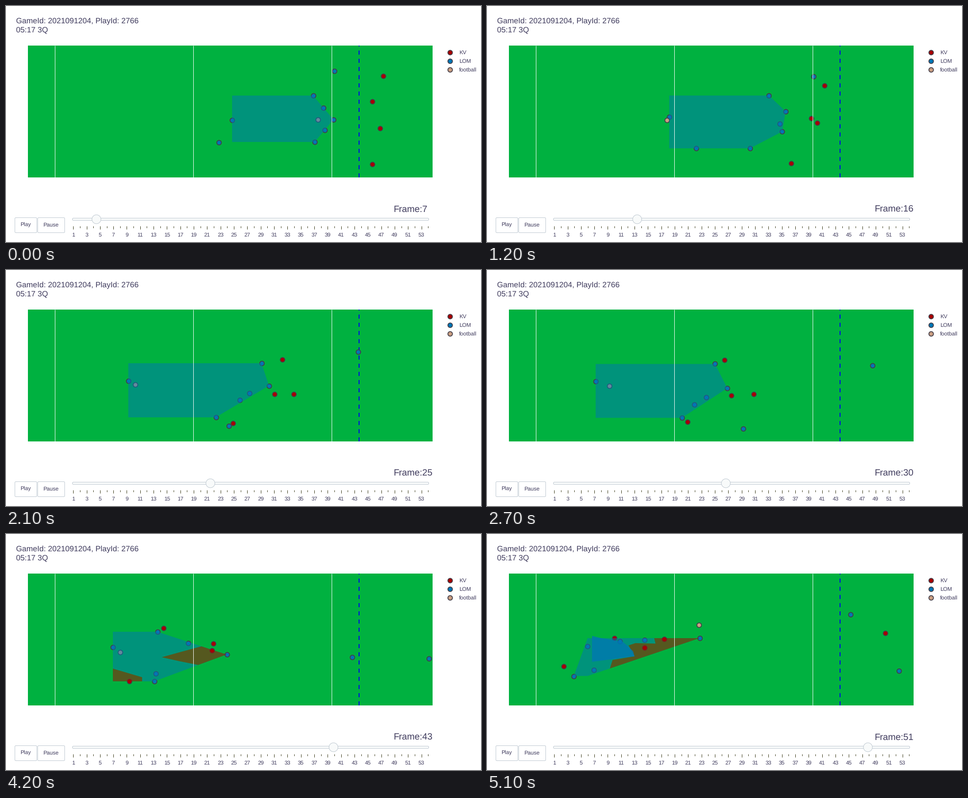
These frames come from a looping animation (1040x519 px, 5200 ms). A matplotlib script:

```python
import matplotlib.pyplot as plt
import numpy as np
from matplotlib.animation import FuncAnimation
from matplotlib.patches import Circle, FancyBboxPatch, PathPatch, Polygon, Rectangle
from matplotlib.path import Path

W, H, DPI = 1040, 519, 64
FRAMES, INTERVAL = 52, 100
PX = 72 / DPI  # points per pixel

GREEN, RED, BLUE, TAN = "#00b140", "#aa0000", "#0076b6", "#cba083"
INK, EDGE, BORDER, PALE = "#403c5e", "#453f49", "#bec8d1", "#f8fafa"

plt.rcParams["font.family"] = "Liberation Sans"
plt.rcParams["text.hinting"] = "none"

# Motion keys: tick of the loop, then positions at those ticks
KEYS = np.array([0, 7, 16, 21, 34, 42, 51])
COUNT = [7, 12, 20, 25, 36, 43, 51]
GRIP = [198, 268.5, 377, 447.5, 611, 717, 834]

OFFENSE = dict(
    qb=[(495, 250.5), (460, 247.5), (340, 242.5), (267.5, 244), (239.5, 247), (234, 249), (220, 247)],
    lt=[(672.5, 197), (644.5, 194.5), (592.5, 200), (559.5, 205), (418, 207.5), (332, 215), (291, 236)],
    lg=[(695, 223.5), (680.5, 224.5), (624, 240.5), (576, 254.5), (470.5, 255), (399, 240), (344.5, 232.5)],
    c=[(717, 249.5), (685, 254), (597, 264), (532.5, 270.5), (456, 283), (483.5, 265), (466, 229)],
    rg=[(698, 273), (694, 273.5), (591, 280), (512, 286), (404, 306), (328, 307), (234, 298.5)],
    rt=[(676, 299), (640, 304), (519, 320), (459.5, 324), (399, 324.5), (325, 324), (190, 312.5)],
    te=[(719, 142.5), (723, 149.5), (722, 162.5), (770.5, 180), (915, 247), (925.5, 274), (901.5, 301)],
    rb=[(465.5, 299.5), (463.5, 301), (461, 326), (487.5, 343), (666, 331), (758, 271), (795.5, 176.5)],
)
DEFENSE = [
    [(826, 153.5), (788, 159), (686.5, 187.5), (604.5, 197), (434.5, 197), (344.5, 207), (278.5, 228.5)],
    [(802, 210), (769.5, 219), (653.5, 267.5), (587.5, 273), (493, 273), (450.5, 256), (344.5, 249.5)],
    [(819, 269), (778, 269), (676, 254), (629.5, 273), (531, 257), (454, 240.5), (387.5, 231)],
    [(801.5, 347.5), (758.5, 348), (582, 343), (497, 337), (383.5, 332), (269.5, 324), (167.5, 291)],
]
LATE_KEYS, LATE = [43, 51], [(945, 232), (872, 217.5)]
BALL_KEYS = [0, 7, 11, 16, 21, 34, 42, 47, 51]
BALL = [(683, 249.5), (508.5, 251), (408, 251), (339, 251), (282.5, 252),
        (252, 257.5), (249.5, 259.5), (240, 257), (464, 200)]

# Ground taken by the rush; the last wedge point is the center's position
WEDGE_A = np.array([(421, 288), (381, 280), (341, 271), (341, 271),
                    (384, 259), (428, 247), (428, 247), (483.5, 265)])
WEDGE_B = np.array([(269, 296), (275, 277), (323, 269), (310, 245),
                    (325, 240), (369, 241), (366, 229), (466, 229)])
CORNER = np.array([(234, 296), (298, 315), (298, 324), (234, 324)])
CORE = [(230, 224), (250, 229), (297, 237), (309, 247), (320, 258), (323, 269), (230, 281)]


def smooth(points, k):
    """Cubic Hermite curve through the key positions."""
    p = np.array(points, float)
    m = np.gradient(p, KEYS, axis=0)
    i = min(np.searchsorted(KEYS, k, side="right") - 1, len(KEYS) - 2)
    h = KEYS[i + 1] - KEYS[i]
    u = (k - KEYS[i]) / h
    return ((1 + 2 * u) * (1 - u) ** 2 * p[i] + u * (1 - u) ** 2 * h * m[i]
            + u * u * (3 - 2 * u) * p[i + 1] + u * u * (u - 1) * h * m[i + 1])


def linear(keys, points, k):
    return np.array([np.interp(k, keys, axis) for axis in zip(*points)])


def cross(a, b, c):
    return (b[0] - a[0]) * (c[1] - b[1]) - (b[1] - a[1]) * (c[0] - b[0])


def hull(points):
    pts = sorted(map(tuple, points))

    def chain(seq):
        out = []
        for p in seq:
            while len(out) > 1 and cross(out[-2], out[-1], p) <= 0:
                out.pop()
            out.append(p)
        return out[:-1]

    return np.array(chain(pts) + chain(pts[::-1]))


def wound(p, sign):
    x, y = p.T
    area = np.sum(x * np.roll(y, -1) - y * np.roll(x, -1))
    return p if area * sign > 0 else p[::-1]


def closed(p):
    return Path(np.vstack([p, p[:1]]), closed=True)


def rush_areas(k, center):
    areas = []
    if k > 37:
        u = np.clip((k - 42) / 9, 0, 1)
        shape = WEDGE_A + (WEDGE_B - WEDGE_A) * u
        areas.append(center + (shape - shape[-1]) * min((k - 37) / 5, 1))
    size = 1 - abs(k - 42) / 4
    if size > 0:
        areas.append(CORNER[3] + (CORNER - CORNER[3]) * size)
    return areas


fig = plt.figure(figsize=(W / DPI, H / DPI), dpi=DPI, facecolor="white")
ax = fig.add_axes([0, 0, 1, 1])
ax.set(xlim=(0, W), ylim=(H, 0))
ax.axis("off")


def text(x, y, s, size, ha="left"):
    return ax.text(x, y, s, size=size * PX, color=INK, ha=ha, va="baseline")


def line(x, y0, y1, color, width, z=1, **kw):
    ax.plot([x, x], [y0, y1], color=color, lw=width * PX, zorder=z,
            solid_capstyle="butt", dash_capstyle="butt", **kw)


def dots(n, color, z):
    return ax.scatter(np.zeros(n), np.zeros(n), s=(10 * PX) ** 2, c=color,
                      edgecolors=EDGE, linewidths=1.8 * PX, zorder=z)


def box(x, y, w, h, r, face):
    ax.add_patch(FancyBboxPatch((x, y), w, h, boxstyle=f"round,pad=0,rounding_size={r}",
                                fc=face, ec=BORDER, lw=PX))


# Header and legend
text(22, 37, "GameId: 2021091204, PlayId: 2766", 17)
text(22, 59, "05:17 3Q", 17)
for i, (name, color) in enumerate([("KV", RED), ("LOM", BLUE), ("football", TAN)]):
    y = 101.5 + 19 * i
    dots(1, color, 2).set_offsets([(971.7, y)])
    text(992, y + 4.5, name, 12)

# Field
field = ax.add_patch(Rectangle((48, 87), 886, 290, fc=GREEN, lw=0, zorder=0))
for x in (106.5, 409.5, 712.5):
    line(x, 87, 377, "white", 1, 6)
line(773, 377, 87, "#0000ee", 2, dashes=(4.5, 4.5))

# Controls
box(19.5, 465.5, 48, 33, 2, "white")
box(69.5, 465.5, 59, 33, 2, "white")
text(42.5, 485, "Play", 12, "center")
text(98, 485, "Pause", 12, "center")
box(145.5, 466.5, 780, 5, 2, PALE)
for i in range(54):
    x = 147.2 + 14.66 * i
    line(x, 484, 488 if i % 2 else 491, "#333310", 1)
    if i % 2 == 0:
        text(x, 507, str(i + 1), 12, "center")
counter = text(848, 453, "", 20)
grip = ax.add_patch(Circle((0, 469), 9.8, fc=PALE, ec=BORDER, lw=PX, zorder=4))

# Moving parts
red_dots = dots(len(DEFENSE) + 1, RED, 2)
blue_dots = dots(len(OFFENSE), BLUE, 3)
ball = dots(1, TAN, 4)
for d in (red_dots, blue_dots, ball):
    d.set_clip_path(field)
empty = Path(np.zeros((1, 2)))
pocket = ax.add_patch(PathPatch(empty, fc=BLUE, alpha=0.5, lw=0, zorder=5))
rush = ax.add_patch(PathPatch(empty, fc=RED, alpha=0.5, lw=0, zorder=5))
core = ax.add_patch(Polygon(CORE, fc=BLUE, alpha=0.75, lw=0, zorder=5))


def draw(k):
    pos = {name: smooth(track, k) for name, track in OFFENSE.items()}
    blue_dots.set_offsets(list(pos.values()))
    red_dots.set_offsets([smooth(t, k) for t in DEFENSE] + [linear(LATE_KEYS, LATE, k)])
    ball.set_offsets([linear(BALL_KEYS, BALL, k)])

    blockers = np.array([pos[n] for n in ("lt", "lg", "c", "rg", "rt")])
    back = pos["qb"][0]
    top, bottom = blockers[:, 1].min(), blockers[:, 1].max()
    shell = wound(hull([*blockers, (back, top), (back, bottom)]), 1)
    # Opposite winding cuts the rush areas out of the pocket
    holes = [closed(wound(a, -1)) for a in rush_areas(k, pos["c"])]
    outline = closed(shell)
    pocket.set_path(Path.make_compound_path(outline, *holes))
    rush.set_visible(bool(holes))
    if holes:
        rush.set_path(Path.make_compound_path(*holes))
    for patch in (pocket, rush):
        patch.set_clip_path(outline, ax.transData)
    core.set_visible(k >= 49)

    counter.set_text(f"Frame:{int(np.interp(k, KEYS, COUNT) + 0.4)}")
    grip.center = (np.interp(k, KEYS, GRIP), 469)
    return []


anim = FuncAnimation(fig, draw, frames=FRAMES, interval=INTERVAL, repeat=True, repeat_delay=0)
plt.show()
```
